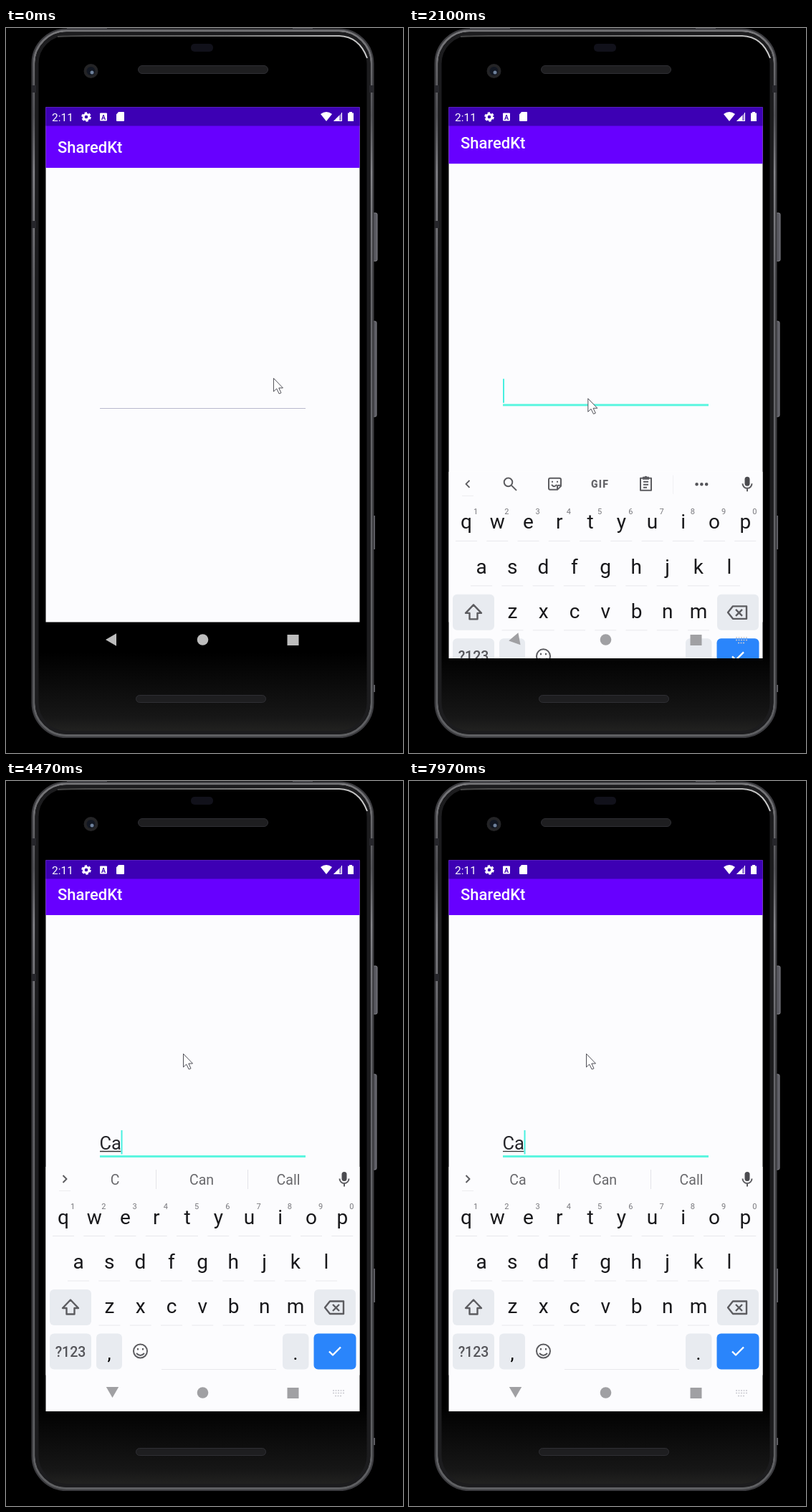
These frames come from a looping animation (554 by 1011 pixels, 8000 ms). An HTML page:

```html
<!DOCTYPE html>
<html lang="en">
<head>
<meta charset="utf-8">
<title>Phone text field</title>
<style>
html, body { margin: 0; width: 100%; height: 100%; overflow: hidden; background: #000; }
svg { display: block; font-family: Roboto, sans-serif; }
.icon { fill: none; stroke: #5c5c60; stroke-width: 2; stroke-linejoin: round; }
.bold { stroke-width: 2.4; }
.metal { fill: #5b5b62; stroke: #85858c; }
</style>
</head>
<body>
<svg width="554" height="1011" viewBox="0 0 554 1011">
  <defs>
    <linearGradient id="edge" x2="0" y2="1">
      <stop offset="0" stop-color="#77777a"/><stop offset=".12" stop-color="#55555a"/>
      <stop offset=".2" stop-color="#85858a"/><stop offset=".35" stop-color="#66666b"/>
      <stop offset="1" stop-color="#5e5f62"/>
    </linearGradient>
    <linearGradient id="body" x2="0" y2="1">
      <stop offset=".88" stop-color="#000"/><stop offset=".97" stop-color="#161616"/>
      <stop offset="1" stop-color="#262624"/>
    </linearGradient>
    <linearGradient id="shine">
      <stop offset="0" stop-color="#444"/><stop offset=".55" stop-color="#777"/>
      <stop offset="1" stop-color="#ccc"/>
    </linearGradient>
    <clipPath id="screen"><rect x="55.500" y="110.500" width="438" height="768.500"/></clipPath>
  </defs>

  <g id="phone">
    <rect class="metal" x="511" y="258" width="7" height="67" rx="2"/>
    <rect class="metal" x="510" y="409" width="7" height="133" rx="2"/>
    <path d="M514 680v47M514 916v10M85 1h56M400 1h28M85 989h56M408 989h30" stroke="#66666c" stroke-width="2"/>
    <rect x="36.500" y="1.500" width="476" height="987.500" rx="48" fill="url(#body)" stroke="#3c3c40" stroke-width="2"/>
    <rect x="39" y="4" width="471" height="982.500" rx="45.500" fill="none" stroke="url(#edge)" stroke-width="3"/>
    <rect x="43" y="8" width="463" height="974.500" rx="42" fill="none" stroke="#1c1c1e" stroke-width="5"/>
    <path d="M72 12Q90 11 112 11H465Q493 12 504 42" fill="none" stroke="url(#shine)" stroke-width="2"/>
    <path d="M36 85h6M507 85h6M36 274h6" stroke="#26262b" stroke-width="10"/>
    <rect x="258" y="22" width="31" height="11" rx="5" fill="#11111a"/>
    <circle cx="118.500" cy="60" r="10" fill="#242426"/>
    <circle cx="118.500" cy="60" r="6" fill="#121722"/>
    <circle cx="120" cy="62" r="2.500" fill="#6f829c"/>
    <g fill="#1e1e20" stroke="#2f2f34">
      <rect x="184.500" y="52.500" width="181" height="11" rx="5.500"/>
      <rect x="181.500" y="930.500" width="181" height="10" rx="5"/>
    </g>
  </g>

  <g clip-path="url(#screen)">
    <rect x="55" y="110" width="439" height="718.500" fill="#fcfcfe"/>
    <g id="app">
      <rect x="55" y="110" width="439" height="85" fill="#6700ff"/>
      <text x="72" y="174" font-size="22" font-weight="500" fill="#fff">SharedKt</text>
      <path id="line"/>
    </g>
    <rect x="55" y="110" width="439" height="26.500" fill="#3d00b4"/>
    <g fill="#fff">
      <text x="64" y="129.500" font-size="15.500">2:11</text>
      <circle cx="112" cy="124" r="3.800" fill="none" stroke="#fff" stroke-width="3"/>
      <circle cx="112" cy="124" r="5.800" fill="none" stroke="#fff" stroke-width="2" stroke-dasharray="3.400 2.670"/>
      <rect x="131" y="118.500" width="10" height="11" rx="1"/>
      <text x="136" y="127.500" font-size="9" font-weight="700" text-anchor="middle" fill="#3d00b4">A</text>
      <path d="M157 117h7q1 0 1 1v11q0 1-1 1h-9q-1 0-1-1v-8.500z"/>
      <path d="M439 120q8-6 16 0l-8 10z"/>
      <path d="M457 130l12-12v12z" opacity=".5"/><path d="M457 130l8-8v8z"/>
      <path d="M468.500 118v11.500H458" fill="none" stroke="#fff"/>
      <path d="M477 118.500h2v-1.500h4v1.500h2V130h-8z"/>
    </g>
    <g id="entry">
      <text id="typed" x="130.500" y="513.500" font-size="25.500" fill="#25252a"></text>
      <path id="underline" stroke="#333" stroke-width="1.300"/>
      <rect id="caret" y="487" width="2" height="33.500" fill="#48efe0"/>
    </g>

    <g id="keyboard">
      <rect x="55" y="538" width="439" height="342" fill="#fcfcfe"/>
      <path id="chevron" class="icon"/>
      <path d="M74 571.500h16" stroke="#ececef"/>
      <g id="tools">
        <g class="icon">
          <circle cx="138.500" cy="552.500" r="5.800"/><path d="M143 557l7 7"/>
          <path d="M197 547h13q2 0 2 2v9l-5 5h-10q-2 0-2-2v-12q0-2 2-2M212 557h-3q-2 0-2 2v4M199 556q4 5 7 0"/>
          <path d="M200 551v2M207 551v2"/>
          <path d="M323 547h15v17h-15zM327 552h7M327 556h7M327 560h5"/>
        </g>
        <path d="M326 549v-4h2.500a2.500 2.500 0 0 1 4 0h2.500v4z" fill="#5c5c60"/>
        <text x="266.500" y="560" font-size="14" font-weight="900" text-anchor="middle" letter-spacing="1.200" fill="#66666a">GIF</text>
        <path d="M368.500 543v26" stroke="#f1f1f4"/>
        <path d="M401.500 555.500h.1m6.700 0h.1m6.700 0h.1" stroke="#55555a" stroke-width="4.500" stroke-linecap="round"/>
      </g>
      <g id="suggestions" font-size="19.500" text-anchor="middle" fill="#68686c">
        <text id="literal" x="152" y="562.500"></text>
        <text x="273" y="562.500">Can</text><text x="394" y="562.500">Call</text>
        <path d="M209.500 542v27M337.500 542v27" stroke="#e4e4e9"/>
      </g>
      <rect x="468.500" y="545" width="7" height="13" rx="3.500" fill="#4c4c50"/>
      <path class="icon" d="M465.500 554.500a6.500 6.500 0 0 0 13 0M472 561v4.500"/>
      <g id="keys"></g>
      <g class="icon bold">
        <path d="M90 723.500l-11 11.500h5.500v8.500h11V735h5.500z"/>
        <path d="M452 725.500h19v17.500h-19l-7-8.750zM456 730l9 9M465 730l-9 9"/>
        <path d="M451 795.500l5 5 11-11" stroke="#fff"/>
      </g>
      <g class="icon">
        <circle cx="187.500" cy="795" r="9.500"/><path d="M182 798q5.500 6 11 0"/>
        <path d="M184 791v2.500M191 791v2.500"/>
      </g>
    </g>

    <g id="nav">
      <path id="back" d="M-9 0L6 -8.700V8.700z"/>
      <circle cx="274.500" cy="853" r="7.800"/><rect x="392.500" y="846" width="16" height="15"/>
      <path id="hide" d="M456 850h16M456 853.500h16M459 857.500h10" stroke="#c9c9d0" stroke-width="1.500" stroke-dasharray="2 1.500"/>
    </g>
  </g>
  <path id="pointer" d="M.5.500V19L4.700 15L8.200 22L11 20.800L7.800 14H13.500Z" fill="#fff" stroke="#3c3c44" stroke-width=".9"/>
</svg>

<script>
const el = id => document.getElementById(id);
const clamp = x => Math.max(0, Math.min(1, x));
const span = (t, from, to) => clamp((t - from) / (to - from));
const show = (id, on) => el(id).setAttribute("visibility", on ? "visible" : "hidden");
const LOOP = 8000;

// Keyboard keys
const label = (x, y, size, text, extra = "") =>
  `<text x="${x}" y="${y}" font-size="${size}" text-anchor="middle" ${extra}>${text}</text>`;
const box = (x, y, w, fill = "#e8ebf0") =>
  `<rect x="${x}" y="${y}" width="${w}" height="50" rx="6" fill="${fill}"/>`;
const letterRow = (letters, left, baseline) => [...letters].map((c, i) => {
  const x = left + i * 43.25;
  return `<path d="M${x - 15} ${baseline + 17}h30" stroke="#e8e8ec"/>` +
    label(x, baseline, 28, c, 'fill="#18181b"');
}).join("");
el("keys").innerHTML =
  letterRow("qwertyuiop", 80, 617.5) + letterRow("asdfghjkl", 101, 680) + letterRow("zxcvbnm", 144.5, 742) +
  [..."1234567890"].map((n, i) => label(93 + i * 43.25, 597, 11, n, 'fill="#77777c"')).join("") +
  box(61, 709, 58) + box(430, 709, 58) + box(61, 770.5, 58) + box(126, 770.5, 36) +
  box(386, 770.5, 36.5) + box(429.5, 770.5, 59, "#2a85fb") +
  '<path d="M217 820.500h160" stroke="#e8e8ec"/>' +
  label(90, 802.5, 19.5, "?123", 'font-weight="500" fill="#55555a"') +
  label(144, 807, 26, ",") + label(404, 807, 26, ".");

// Pointer stops: time, x, y
const pointerStops = [
  [0, 373, 488], [30, 371, 487], [400, 214, 352], [600, 214, 352], [760, 208, 365],
  [1400, 240, 512], [1430, 246, 512], [1600, 246, 512], [1730, 251, 512],
  [2170, 249, 517], [2400, 247, 380], [LOOP, 247, 380]
];
function pointerAt(t) {
  const i = pointerStops.findIndex(s => s[0] > t);
  const [t0, x0, y0] = pointerStops[i - 1], [t1, x1, y1] = pointerStops[i];
  const p = span(t, t0, t1);
  return [x0 + (x1 - x0) * p, y0 + (y1 - y0) * p];
}

// Each edit restarts the caret's blink
const edits = [[1930, ""], [4000, "C"], [4470, "Ca"], [4900, "C"], [5070, ""], [6500, "C"], [6940, "Ca"]];
const caretX = { "": 131, C: 147, Ca: 160.5 };
const focusTime = edits[0][0];

function draw(t) {
  const focused = t >= focusTime;
  const [editTime, text] = edits.filter(e => e[0] <= t).pop() || [0, ""];
  const slide = 277 * (1 - span(t, 2000, 2300)) ** 3;
  const lift = 8 * span(t, 2000, 2140);
  const open = t >= 2000;

  el("app").setAttribute("transform", `translate(0 ${-lift})`);
  el("line").setAttribute("stroke", focused ? "#5cf6e0" : "#b9b9cd");
  el("line").setAttribute("stroke-width", focused ? 3 : 1);
  el("line").setAttribute("d", `M131 ${focused ? 531.5 : 530.5}H418`);
  el("entry").setAttribute("transform", `translate(0 ${8 - lift})`);

  el("typed").textContent = text;
  el("underline").setAttribute("d", text ? `M131 516.500H${caretX[text]}` : "");
  el("caret").setAttribute("x", caretX[text]);
  show("caret", focused && (t - editTime) % 1000 < 500);

  const suggesting = (t >= 4200 && t < 5130) || t >= 6700;
  show("tools", !suggesting);
  show("suggestions", suggesting);
  el("literal").textContent = (t >= 4700 && t < 4930) || t >= 6970 ? "Ca" : "C";
  el("chevron").setAttribute("d", suggesting ? "M79.500 550l5 5-5 5" : "M84.500 550l-5 5 5 5");

  el("keyboard").setAttribute("transform", `translate(0 ${slide})`);
  el("keyboard").setAttribute("display", open ? "inline" : "none");
  el("nav").setAttribute("fill", open ? "#a0a0a3" : "#bdbdbd");
  const turn = span(t, 2070, 2340);
  el("back").setAttribute("transform", `translate(${148 + turn / 2} ${853 - turn * 2}) rotate(${-90 * turn})`);
  show("hide", open);

  el("pointer").setAttribute("transform", `translate(${pointerAt(t)})`);
}

function tick() {
  draw(performance.now() % LOOP);
  requestAnimationFrame(tick);
}
tick();
</script>
</body>
</html>
```
